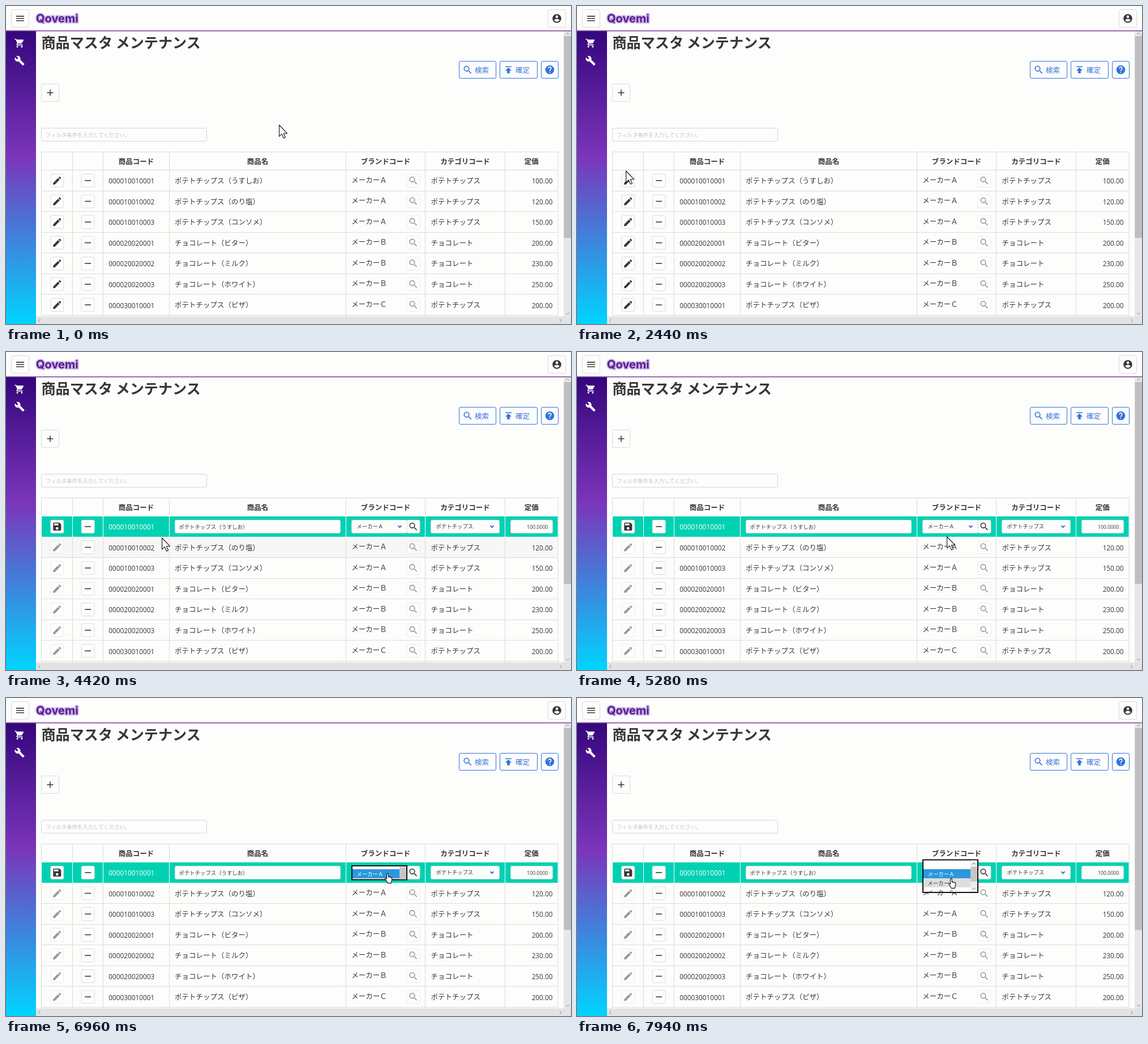
Write an HTML page that moves like this. It is 998 px wide and 561 px high and loops after 8 s.

```html
<!DOCTYPE html>
<html lang="ja">
<head>
<meta charset="utf-8">
<title>商品マスタ メンテナンス</title>
<style>
html, body { margin: 0; width: 100%; height: 100%; overflow: hidden; background: #fdfdfc; }
svg { display: block; }
text { font-family: "Noto Sans CJK JP", "Noto Sans CJK", sans-serif; font-size: 12.5px; fill: #363636; white-space: pre; }
text.num { font-family: "Open Sans", "Noto Sans", sans-serif; font-size: 11.8px; }
text.small { font-size: 9.4px; }
text.small.num { font-size: 8.8px; }
text.bold { font-weight: 700; }
</style>
</head>
<body>
<svg id="stage" width="998" height="561" viewBox="0 0 998 561">
  <defs>
    <linearGradient id="side" x1="0" y1="0" x2="0" y2="1">
      <stop offset="0" stop-color="#35067c"/>
      <stop offset=".43" stop-color="#7b35ba"/>
      <stop offset="1" stop-color="#00d4ff"/>
    </linearGradient>
    <clipPath id="view"><rect x="53" y="45" width="932" height="502"/></clipPath>
    <clipPath id="listClip"><rect id="listRect" x="612" width="95"/></clipPath>
  </defs>
</svg>
<script>
const NS = 'http://www.w3.org/2000/svg';
const LOOP = 8000, EDIT = 3840, PRESS = 3400, LIST = 6900, GROW = 6960;
const INK = '#363636', LINE = '#dbdbdb', BLUE = '#3273dc', TEAL = '#00d1b2', PAPER = '#fdfdfc';
const stage = document.getElementById('stage');

const ICONS = {
  menu: 'M3 6H21V8H3zM3 11H21V13H3zM3 16H21V18H3z',
  plus: 'M19 13H13V19H11V13H5V11H11V5H13V11H19z',
  minus: 'M19 13H5V11H19z',
  search: 'M9.5 3A6.5 6.5 0 0 1 16 9.5C16 11.1 15.4 12.6 14.4 13.7L14.7 14H15.5L20.5 19 19 20.5 14 15.5V14.7L13.7 14.4A6.5 6.5 0 1 1 9.5 3M9.5 5A4.5 4.5 0 1 0 9.5 14 4.5 4.5 0 1 0 9.5 5',
  pencil: 'M20.7 7C21.1 6.6 21.1 6 20.7 5.6L18.4 3.3C18 2.9 17.3 2.9 17 3.3L15.1 5.1 18.9 8.9M3 17.3V21H6.8L17.8 9.9 14 6.2z',
  save: 'M15 9H5V5H15M12 19A3 3 0 1 1 12 13 3 3 0 1 1 12 19M17 3H5A2 2 0 0 0 3 5V19A2 2 0 0 0 5 21H19A2 2 0 0 0 21 19V7z',
  upload: 'M5 4V6H19V4zM5 14H9V20H15V14H19L12 7z',
  help: 'M15 11.3L14.2 12.2C13.4 12.9 13 13.5 13 15H11V14.5C11 13.4 11.4 12.4 12.2 11.7L13.4 10.4A2 2 0 1 0 10 9H8A4 4 0 1 1 15 11.3M13 19H11V17H13M12 2A10 10 0 1 0 12 22 10 10 0 1 0 12 2',
  user: 'M12 19.2C9.5 19.2 7.3 17.9 6 16 6 14 10 12.9 12 12.9S18 14 18 16C16.7 17.9 14.5 19.2 12 19.2M12 5A3 3 0 1 1 12 11 3 3 0 1 1 12 5M12 2A10 10 0 1 0 12 22 10 10 0 1 0 12 2',
  cart: 'M17 18A2 2 0 1 1 17 22 2 2 0 1 1 17 18M7 18A2 2 0 1 1 7 22 2 2 0 1 1 7 18M1 2H4.3L5.2 4H20A1 1 0 0 1 20.9 5.5L17.3 12C17 12.6 16.3 13 15.5 13H8.1L7.2 14.6 7.4 15H19V17H7A2 2 0 0 1 5.2 14L6.6 11.6 3 4H1z',
  wrench: 'M22.7 19L13.6 9.9C14.5 7.6 14 4.9 12.1 3 10.1 1 7.1.6 4.7 1.7L9 6 6 9 1.6 4.7C.4 7.1.9 10.1 2.9 12.1 4.8 14 7.5 14.5 9.8 13.6L18.9 22.7A1 1 0 0 0 20.3 22.7L22.6 20.4A1 1 0 0 0 22.7 19'
};

function el(tag, attrs, parent = stage) {
  const node = document.createElementNS(NS, tag);
  for (const key in attrs) node.setAttribute(key, attrs[key]);
  return parent.appendChild(node);
}
const group = (parent, attrs = {}) => el('g', attrs, parent);
const box = (x, y, width, height, fill, parent, more) => el('rect', { x, y, width, height, fill, ...more }, parent);
const stroke = (d, color, width, parent) => el('path', { d, fill: 'none', stroke: color, 'stroke-width': width }, parent);
function label(str, x, y, parent, cls = '', style = '', anchor = 'start') {
  el('text', { x, y, class: cls, style, 'text-anchor': anchor }, parent).textContent = str;
}
function icon(name, cx, cy, fill = INK, parent) {
  const s = 18.75 / 24;
  el('path', { d: ICONS[name], fill, 'fill-rule': 'evenodd',
    transform: `translate(${cx - 12 * s} ${cy - 12 * s}) scale(${s})` }, parent);
}
const frame = (x, y, w, h, color, parent, fill = PAPER) =>
  box(x + .5, y + .5, w - 1, h - 1, fill, parent, { stroke: color, rx: 2.5 });
function iconButton(name, cx, cy, parent) {
  const g = group(parent);
  g.border = frame(cx - 12, cy - 12, 24, 24, LINE, g);
  icon(name, cx, cy, INK, g);
  return g;
}
const show = (node, on) => node.setAttribute('visibility', on ? 'visible' : 'hidden');

// Header and sidebar
box(0, 0, 998, 561, PAPER);
box(0, 44, 53, 517, 'url(#side)');
box(0, 43, 998, 1.6, '#84489f');
frame(9, 6, 32, 32, LINE);
icon('menu', 25, 22);
label('Qovemi', 53, 29, stage, 'bold',
  'font-family:Inter,sans-serif;font-size:20px;fill:#52208a;stroke:#cdb2ea;stroke-width:4px;stroke-linejoin:round;paint-order:stroke');
frame(957, 6, 32, 32, LINE);
icon('user', 973, 22);
icon('cart', 24, 65.5, '#fff');
icon('wrench', 24, 96.5, '#fff');

// Page tools
label('商品マスタ メンテナンス', 62.5, 74, stage, 'bold', 'font-size:25.1px');
for (const [x, w, name, str] of [[800, 66, 'search', '検索'], [872, 67, 'upload', '確定'], [945, 31, 'help', '']]) {
  frame(x, 97, w, 31, BLUE);
  icon(name, x + 15.5, 112.5, BLUE);
  label(str, x + 28, 117.5, stage, '', `fill:${BLUE}`);
}
frame(62, 137, 32, 32, LINE);
icon('plus', 78, 153);
frame(62, 215, 293, 24, '#d6d4e6');
label('フィルタ条件を入力してください。', 70, 230.5, stage, 'small', 'fill:#c3c3ca');

// Table
const COLS = [62.5, 117.5, 171.5, 288.5, 600.5, 740.5, 881.5, 975];
const TOP = 289.5, PITCH = 36.55;
const CHIPS = 'ポテトチップス', CHOCO = 'チョコレート';
const ITEMS = [
  ['000010010001', CHIPS, 'うすしお', 'Ａ', 100], ['000010010002', CHIPS, 'のり塩', 'Ａ', 120],
  ['000010010003', CHIPS, 'コンソメ', 'Ａ', 150], ['000020020001', CHOCO, 'ビター', 'Ｂ', 200],
  ['000020020002', CHOCO, 'ミルク', 'Ｂ', 230], ['000020020003', CHOCO, 'ホワイト', 'Ｂ', 250],
  ['000030010001', CHIPS, 'ピザ', 'Ｃ', 200]
];
const table = group(stage, { 'clip-path': 'url(#view)' });
const hovers = ITEMS.map((_, i) => box(62.5, TOP + i * PITCH, 912.5, PITCH, '#f7f7f7', table));
for (const x of COLS) stroke(`M${x} 257V548`, LINE, 1, table);
stroke('M62 257.5H975.5', LINE, 1, table);
for (let i = 0; i < 8; i++) stroke(`M62 ${Math.round(TOP + i * PITCH - .5) + .5}H975.5`, LINE, 1, table);
['商品コード', '商品名', 'ブランドコード', 'カテゴリコード', '定価'].forEach((str, i) =>
  label(str, (COLS[i + 2] + COLS[i + 3]) / 2, 278.7, table, 'bold', '', 'middle'));

const pencils = [];
let plainRow;
ITEMS.forEach(([code, kind, taste, maker, price], i) => {
  const row = group(table), y = TOP + i * PITCH, mid = y + 18.5;
  pencils.push(iconButton('pencil', 90.3, mid, row));
  iconButton('minus', 144.7, mid, row);
  label(code, 181.3, y + 23.7, row, 'num');
  label(`${kind}（${taste}）`, 298, y + 23.5, row);
  label('メーカー' + maker, 610.3, y + 22, row);
  iconButton('search', 719.5, mid, row).setAttribute('opacity', .5);
  label(kind, 750.5, y + 23.5, row);
  label(price.toFixed(2), 965.5, y + 23.7, row, 'num', '', 'end');
  if (!i) plainRow = row;
});

// Row being edited
const editRow = group(table);
box(62, 289, 913.5, 38, TEAL, editRow);
for (const x of COLS) stroke(`M${x} 289V327`, '#fff', 1, editRow);
for (const y of [289.5, 326.5]) stroke(`M62 ${y}H975.5`, '#fff', 1, editRow);
iconButton('save', 90.3, 308, editRow);
iconButton('minus', 144.7, 308, editRow);
label(ITEMS[0][0], 181.3, 313.2, editRow, 'num', 'fill:#fff');
for (const [x, w] of [[298, 293], [610, 99], [750, 122], [891, 75]]) frame(x, 296, w, 24, LINE, editRow);
label(CHIPS + '（うすしお）', 305.5, 311.5, editRow, 'small');
label('メーカーＡ', 619.5, 311.3, editRow, 'small');
label(CHIPS, 759.5, 311.3, editRow, 'small');
label('100.0000', 957.5, 311.5, editRow, 'num small', '', 'end');
for (const x of [695.5, 858.5]) stroke(`M${x - 3} 306.3l3 3 3-3`, BLUE, 2, editRow);
iconButton('search', 719.5, 308, editRow);

// Scrollbars
box(985, 45, 13, 503, '#e7e7e7');
box(985.5, 53, 12.5, 356, '#bebebe');
box(53, 547.5, 945, 13.5, '#e3e3e3');
stroke('M989 50l3-3 3 3M989 541l3 3 3-3M60.5 552l-3 3 3 3M978 552l3 3-3 3', '#8a8a8a', 1);

// Drop-down list
const list = group(stage);
const listFrame = box(611, 0, 97, 0, '#fff', list, { stroke: '#111', 'stroke-width': 2 });
const listBody = group(list, { 'clip-path': 'url(#listClip)' });
box(612, 302, 83, 16, '#2a98dc', listBody);
const second = box(612, 318, 83, 16, '#dedede', listBody);
['Ａ', 'Ｂ', 'Ｃ'].forEach((maker, i) =>
  label('メーカー' + maker, 619.5, 313.5 + i * 16, listBody, 'small', i ? '' : 'fill:#fff'));
box(695, 286, 12, 57, '#eeeeee', listBody);
box(695, 298, 12, 26, '#c6c6c6', listBody);
stroke('M698.5 293.5l2.5-2.5 2.5 2.5M698.5 335l2.5 2.5 2.5-2.5', '#777', 1, listBody);

// Pointers
const pointer = group(stage);
const ink = { fill: '#fff', stroke: '#111', 'stroke-width': 1.1, 'stroke-linejoin': 'round' };
const arrow = el('path', { ...ink, d: 'M.6 1V21.2L5.2 16.9 8.6 24.2 11.6 22.8 8.3 15.7H14.6z' }, pointer);
const hand = el('path', { ...ink, transform: 'translate(-5 0)',
  d: 'M3.5 10.6V2A1.4 1.4 0 0 1 6.3 2V7A1.3 1.3 0 0 1 8.7 7.3 1.2 1.2 0 0 1 10.8 7.9 1 1 0 0 1 12.6 8.6V12C12.6 14 11.5 15 11.3 17.6H5.2C5 15 1 12 .6 9.9 .4 8.3 2.3 8.2 3.5 10.6z' }, pointer);

function tick(t) {
  const u = t - (t < 3600 ? 40 : 60), burst = Math.floor(u / 140);
  return burst * 3 + Math.min(2, Math.floor((u - burst * 140) / 20));
}
const PATH = [
  [0, 482, 209], [1200, 482, 209], [1300, 480, 210], [1440, 438, 217], [1860, 184, 264], [2040, 100, 285],
  [2440, 86, 290], [2860, 90, 300], [3000, 91, 301], [EDIT, 91, 301], [4420, 275, 327], [4860, 470, 318],
  [5280, 653, 325], [5480, 668, 326], [5760, 674, 318], [6080, 677, 312], [6220, 677, 312],
  [6500, 674, 309], [7480, 674, 309], [7940, 661, 318]
].map(([t, x, y]) => [tick(t), x, y]);

const slope = (i, axis) => (PATH[i + 1][axis] - PATH[i][axis]) / (PATH[i + 1][0] - PATH[i][0]);
function tangent(i, axis) {
  if (!i || i === PATH.length - 1) return 0;
  const a = slope(i - 1, axis), b = slope(i, axis);
  return a * b > 0 ? 2 * a * b / (a + b) : 0;
}
function along(k, axis) {
  let i = 0;
  while (i < PATH.length - 2 && k >= PATH[i + 1][0]) i++;
  const h = PATH[i + 1][0] - PATH[i][0], s = Math.min(1, Math.max(0, (k - PATH[i][0]) / h)), r = 1 - s;
  return PATH[i][axis] * r * r * (1 + 2 * s) + PATH[i + 1][axis] * s * s * (3 - 2 * s)
    + h * s * r * (tangent(i, axis) * r - tangent(i + 1, axis) * s);
}

function draw(t) {
  const k = tick(t), x = Math.round(along(k, 1)), y = Math.round(along(k, 2));
  const editing = t >= EDIT, open = t >= LIST;
  const overField = y > 296 && y < 320 && (x > 79 && x < 102 && !editing || x > 610 && x < 709 && editing);
  const row = Math.floor((y - .6 - TOP) / PITCH);
  hovers.forEach((node, i) => show(node, i === row && !open));
  show(plainRow, !editing);
  show(editRow, editing);
  pencils.forEach((node, i) => { if (i) node.setAttribute('opacity', editing ? .5 : 1); });
  pencils[0].border.setAttribute('stroke', t >= PRESS ? '#4a4a4a' : overField ? '#b5b5b5' : LINE);

  show(list, open);
  const grow = Math.min(1, Math.max(0, (k - tick(GROW)) / 5)), ease = 1 - (1 - grow) ** 2;
  const top = 296 - 10.5 * ease, height = 24.5 + 33 * ease;
  listFrame.setAttribute('y', top);
  listFrame.setAttribute('height', height);
  listRect.setAttribute('y', top + 1);
  listRect.setAttribute('height', height - 2);
  show(second, open && y >= 318);

  const useHand = overField || open;
  show(hand, useHand);
  show(arrow, !useHand);
  pointer.setAttribute('transform', `translate(${x} ${y})`);
}

const listRect = document.getElementById('listRect');
const start = performance.now();
function loop() {
  draw((performance.now() - start) % LOOP);
  requestAnimationFrame(loop);
}
loop();
</script>
</body>
</html>
```
